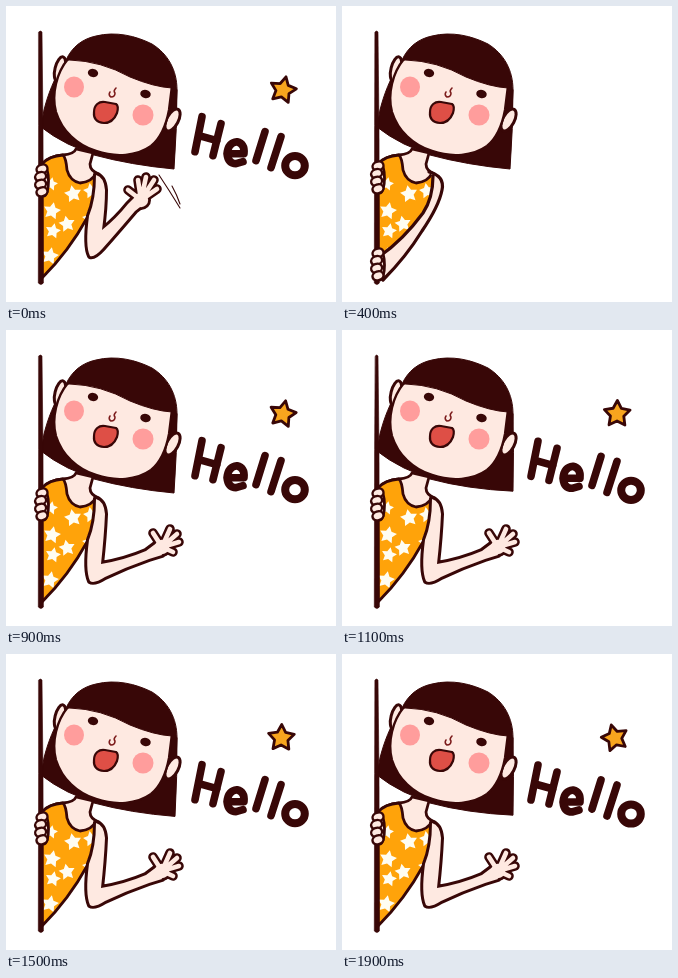
An HTML page for the animation above (2000 ms loop, 330x296 px).

```html
<!DOCTYPE html>
<html lang="en">
<head>
<meta charset="utf-8">
<title>Hello</title>
<style>
html, body { margin: 0; width: 100%; height: 100%; overflow: hidden; background: #fff; }
svg { display: block; width: 100vw; height: 100vh; }
</style>
</head>
<body>
<svg id="stage" viewBox="0 0 330 296" role="img" aria-label="A girl behind a wall waves hello"></svg>
<script>
const stage = document.getElementById('stage');
const INK = '#380707', SKIN = '#fee9e1', ORANGE = '#ffa30a';
const STEP = 100, COUNT = 20;

// One value per drawing
const sway = [0, 0, 0, 0, 0, -2, -5, -6, -3, 0, 2, 3, 2, 2, 2, 1, 0, 0, 1, 3];
const tilt = [13, 8, 0, 0, 0, 0, -4, -8, 3, 12, 6, 1, 7, 14, 8, 2, -4, 4, -8, -15];
// Girl's offset while she pops out from behind the wall
const entry = { 1: [-150, 20], 2: [-62, 8], 3: [3, -9] };

const path = (d, fill, width = 0) =>
  `<path d="${d}" fill="${fill}" stroke="${INK}" stroke-width="${width}"/>`;
const line = (d, width, color = INK) =>
  `<path d="${d}" fill="none" stroke="${color}" stroke-width="${width}"/>`;
const oval = (x, y, rx, ry, fill, turn = 0, width = 0) =>
  `<ellipse cx="${x}" cy="${y}" rx="${rx}" ry="${ry}" fill="${fill}" stroke="${INK}" stroke-width="${width}" transform="rotate(${turn} ${x} ${y})"/>`;

function star(x, y, r, turn, fill, width = 0) {
  let d = '';
  for (let i = 0; i < 10; i++) {
    const a = (i * 36 + turn - 90) * Math.PI / 180;
    const q = i % 2 ? r * 0.52 : r;
    d += (i ? 'L' : 'M') + (x + q * Math.cos(a)).toFixed(2) + ' ' + (y + q * Math.sin(a)).toFixed(2);
  }
  return path(d + 'Z', fill, width);
}

function backHair(s) {
  return path(`M58 56C48 73 42 88 38 104L35 121Q46 130 62 138L88 149
    Q125 159 ${168 + s} ${163 - s * 0.6}Q${171 + s * 0.3} 122 171 84Z`, INK, 1);
}

function head(s) {
  return oval(54, 63, 5, 12.5, SKIN, 14, 3) + oval(166.5, 114, 5.8, 12, SKIN, 28, 3) +
    path(`M62 53C51 66 45 88 50 106C56 125 71 139 90 145C110 152 131 150 145 140
      C155 132 160 120 163 104L166 80L110 50Z`, SKIN, 2.4) +
    path(`M60 54C66 41 76 33 90 30C110 25 130 30 146 38C162 48 171 64 171 84L${170 + s * 0.1} 104
      L165 102L166 82Q148 81 124 71Q95 55 64 54Z`, INK, 1) +
    oval(68, 81, 10, 10.5, '#ff9d9c') + oval(137, 109, 10.5, 10.5, '#ff9d9c') +
    oval(87, 67, 5.2, 4.1, INK, 8) + oval(139.5, 88, 5.3, 4.2, INK, 14) +
    line('M110 82Q107 85 109 87Q109 91 105 91Q102 89 104 86', 1.6, '#7c1c1c') +
    path('M88 106C88 99 93 95 99 96L110 98Q113 100 111 107Q107 117 98 117Q87 116 88 106Z', '#de4f46', 2.2);
}

function body() {
  const dress = `M36 158Q43 150 57 149Q60 152 61 164Q64 175 74 177Q86 176 90 167
    Q94 170 91 192Q88 203 81 212Q63 245 36 272Z`;
  const dots = [[67, 188, 9], [46, 205, 9], [61, 218, 8.5], [47, 225, 8], [83, 212, 7],
    [44, 250, 9], [85, 185, 8], [45, 178, 7]];
  return path('M70 143Q68 148 57 149Q43 150 36 158L40 178L89 178L93 168Q84 165 84 158L87 147Z', SKIN, 2.8) +
    path(dress, ORANGE) +
    `<g clip-path="url(#dress)">${dots.map(([x, y, r], i) => star(x, y, r, i % 2 ? 12 : -10, '#fffdf2')).join('')}</g>` +
    `<clipPath id="dress"><path d="${dress}"/></clipPath>` + path(dress, 'none', 2.8);
}

// Dark pass below, skin pass above, so the outline runs around arm and hand together
function limb(arm, palm, tips) {
  const [x, y] = palm;
  const fingers = tips.map(([a, b]) => `M${x} ${y}L${a} ${b}`).join('');
  return path(arm, INK, 6) + oval(x, y, 10, 10, INK) + line(fingers, 9.6) +
    path(arm, SKIN) + oval(x, y, 7.2, 7.2, SKIN) + line(fingers, 4.6, SKIN);
}

const armUp = () => limb(
  'M90 169Q98 171 99 184Q99 202 96 224Q110 213 122 198L130 190L138 198L129 205Q112 225 97 242Q88 252 84 250Q79 240 83 210Q90 193 90 169Z',
  [135, 194], [[122, 184], [132, 174], [140, 171], [148, 174], [151, 183]]);

const armOut = () => limb(
  'M90 169Q98 171 99 184Q98 207 95 234Q119 230 140 221L152 212L156 225L143 229Q120 237 99 247Q88 254 84 251Q79 240 83 210Q90 193 90 169Z',
  [156, 217], [[147, 203], [164, 199], [171, 204], [173, 212], [167, 222]]);

const armDown = () => path(
  'M87 166Q103 170 100 184Q97 200 80 225Q64 251 41 274L38 250Q61 234 81 207Q91 192 91 170', SKIN, 3.2);

function grip(y) {
  let out = oval(38, y + 12, 4.5, 15, SKIN, 0, 2.8);
  for (let i = 0; i < 4; i++) {
    const x = i === 1 || i === 2 ? 34.6 : 36;
    out += oval(x, y + i * 7.6, 5.6, 4.4, SKIN, -20, 2.4);
  }
  return out;
}

const hello = () => line(`M196 111L189 146M215 118L207 150M193 130L211 135
  M222 148L238 148Q239 138 231 136Q222 137 221 148Q222 158 230 158L237 156
  M259 126L250 155M275 131L265 162`, 7.6) +
  `<ellipse cx="289" cy="160" rx="9.8" ry="9.6" fill="none" stroke="${INK}" stroke-width="8"/>`;

function draw(n) {
  const s = sway[n], [dx, dy] = entry[n] || [0, 0];
  const peeking = n >= 1 && n <= 5, up = !peeking && n % 2 === 0;
  const wob = (n % 3 - 1) * 0.3;
  let out = `<clipPath id="wall"><path d="M34 0H330V296H34Z"/></clipPath>
    <g clip-path="url(#wall)"><g transform="translate(${dx} ${dy})">` +
    backHair(s) + body() + (peeking ? armDown() : '') + head(s) + '</g></g>';
  out += path(`M${33 + wob} 26Q34.5 24 36 26L37 120L37.4 277Q35 280 32.3 277L32.6 120Z`, INK, 0.6);
  out += grip(peeking ? 160 : 163);
  if (peeking) return out + grip(247);

  out += up ? armUp() : armOut();
  if (up) out += line('M153 169Q163 184 174 202M166 180Q171 189 174 198', 1.1);
  return out + `<g transform="translate(0 ${wob})">${hello()}</g>` +
    star(275 + tilt[n] * 0.15, 84, 13.5, tilt[n], '#f8a51e', 2.8);
}

let shown = -1;
function tick(now) {
  const n = Math.floor(now / STEP) % COUNT;
  if (n !== shown) {
    shown = n;
    stage.innerHTML = `<g stroke-linecap="round" stroke-linejoin="round">${draw(n)}</g>`;
  }
}

const start = performance.now();
function loop() {
  tick(performance.now() - start);
  requestAnimationFrame(loop);
}
loop();
</script>
</body>
</html>
```
